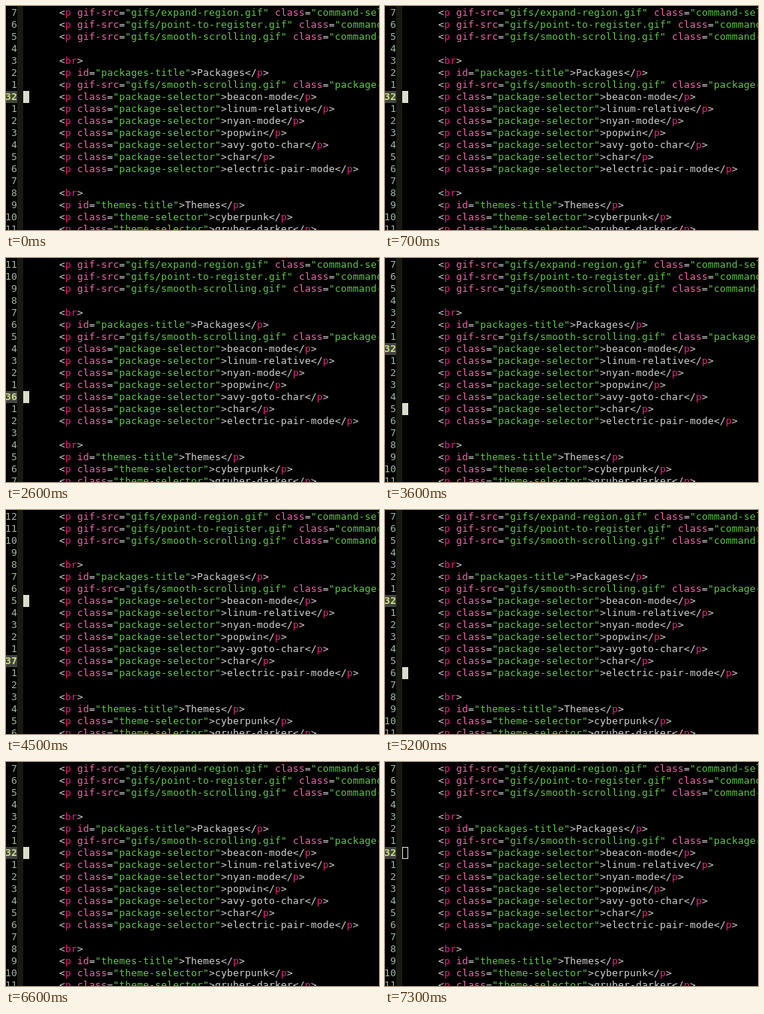
Animation of 498x298 px, one loop 7400 ms. Source, as an HTML page:

```html
<!DOCTYPE html>
<html lang="en">
<head>
<meta charset="utf-8">
<title>Relative line numbers</title>
<style>
  html, body { margin: 0; width: 100%; height: 100%; overflow: hidden; background: #000; }
  svg { display: block; width: 498px; height: 298px; }
  text {
    font: 13px "DejaVu Sans Mono", monospace;
    letter-spacing: calc(8px - 1ch); /* whole-pixel terminal cells */
    white-space: pre;
    fill: #d3d3d3;
  }
  .tag { fill: #f01e82; }
  .attr { fill: #f468ae; }
  .string { fill: #61c84a; }
  .number { fill: #9fb79f; text-anchor: end; }
  .number.current { fill: #cae682; font-weight: bold; }
  #fringe { fill: #191914; }
  #highlight { fill: #444440; }
  #cursor { fill: #dcdccc; }
  #cursor.hollow { fill: none; stroke: #dcdccc; }
</style>
</head>
<body>
<svg viewBox="0 0 498 298">
  <rect id="fringe" x="15" y="0" width="8" height="298"/>
  <rect id="highlight" x="0" width="15" height="16"/>
  <rect id="cursor"/>
  <g id="numbers"></g>
  <g id="code"></g>
</svg>
<script>
const LOOP = 7400, STEP = 100, GUTTER_DELAY = 100, BLUR_TIME = 7300;
const FIRST_LINE = 25, ROW_HEIGHT = 16, TOP = 1, ASCENT = 12;

// Cursor jumps: [time, line]
const jumps = [[0, 32], [2200, 36], [2900, 32], [3600, 37], [4500, 32], [5200, 38], [5900, 32]];

const item = (kind, name) => `<p class="${kind}-selector">${name}</p>`;
const demo = (kind, name) => `<p gif-src="gifs/${name}.gif" class="${kind}-selector">${name}</p>`;
const title = (id, name) => `<p id="${id}-title">${name}</p>`;
const packages = ["beacon-mode", "linum-relative", "nyan-mode", "popwin",
  "avy-goto-char", "char", "electric-pair-mode"];

const lines = [
  ...["expand-region", "point-to-register", "smooth-scrolling"].map(n => demo("command", n)),
  "", "<br>", title("packages", "Packages"),
  demo("package", "smooth-scrolling"),
  ...packages.map(n => item("package", n)),
  "", "<br>", title("themes", "Themes"),
  ...["cyberpunk", "gruber-darker"].map(n => item("theme", n))
];

const byId = id => document.getElementById(id);
const rowTop = row => TOP + row * ROW_HEIGHT;

function setAttributes(node, attrs) {
  for (const key in attrs) node.setAttribute(key, attrs[key]);
}

function add(parent, name, attrs, content = "") {
  const node = document.createElementNS(parent.namespaceURI, name);
  setAttributes(node, attrs);
  node.textContent = content;
  return parent.appendChild(node);
}

function addCode(line, row) {
  const text = add(byId("code"), "text", { x: 71, y: rowTop(row) + ASCENT });
  const tokens = /(<\/?)(\w+)|("[^"]*")|([\w-]+)(?==)|[\w-]+|[^\w"<]/g;
  for (const [all, open, tag, string, attr] of line.matchAll(tokens)) {
    if (open) add(text, "tspan", {}, open);
    const kind = tag ? "tag" : string ? "string" : attr ? "attr" : "plain";
    add(text, "tspan", { class: kind }, tag || all);
  }
}

lines.forEach(addCode);
const numbers = lines.map((_, row) =>
  add(byId("numbers"), "text", { x: 15, y: rowTop(row) + ASCENT, class: "number" }));

const lineAt = time => jumps.filter(([start]) => start <= Math.max(time, 0)).pop()[1];

let shown = -1;
function draw(now) {
  const time = Math.floor((now % LOOP) / STEP) * STEP;
  if (time === shown) return;
  shown = time;

  const gutterLine = lineAt(time - GUTTER_DELAY);
  const current = gutterLine - FIRST_LINE;
  numbers.forEach((node, row) => {
    node.textContent = row === current ? gutterLine : Math.abs(row - current);
    node.classList.toggle("current", row === current);
  });
  byId("highlight").setAttribute("y", rowTop(current));

  const hollow = time >= BLUR_TIME, inset = hollow ? 0.5 : 0;
  const cursor = byId("cursor");
  cursor.classList.toggle("hollow", hollow);
  setAttributes(cursor, {
    x: 23 + inset,
    y: rowTop(lineAt(time) - FIRST_LINE) + inset,
    width: 8 - 2 * inset,
    height: ROW_HEIGHT - 2 * inset
  });
}

const start = performance.now();
function tick() {
  draw(performance.now() - start);
  requestAnimationFrame(tick);
}
tick();
</script>
</body>
</html>
```
